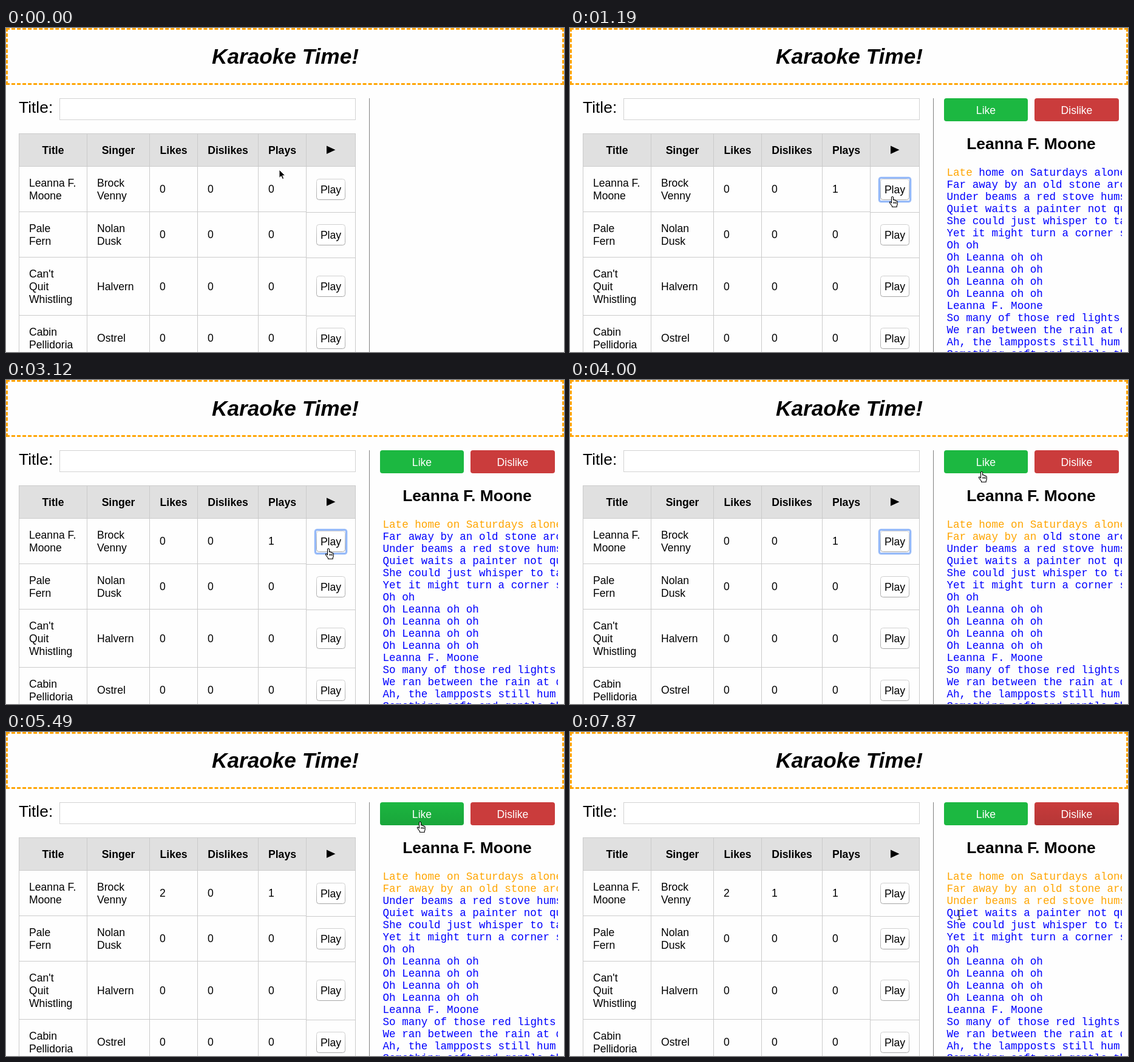
Recreate the animation shown at these times as an HTML page. Size 919 by 535 pixels, loop 8000 ms.

```html
<!DOCTYPE html>
<html lang="en">
<head>
<meta charset="utf-8">
<title>Karaoke Time!</title>
<style>
  html, body { margin: 0; width: 100%; height: 100%; overflow: hidden; background: #fefefe; }
  header { position: absolute; left: 0; top: 0; width: 919px; height: 94px; box-sizing: border-box; border: 3px dashed orange; }
  svg { position: absolute; left: 0; top: 0; }
  text { font: 17.6px "Liberation Sans", Arial, sans-serif; white-space: pre; }
  .mid { text-anchor: middle; }
  .bold { font-weight: bold; }
  .big { font-size: 26.4px; }
  .head { font-size: 35.2px; font-style: italic; }
  .lyric { font-family: "Liberation Mono", "Courier New", monospace; fill: #00f; }
  .white { fill: #fff; }
</style>
</head>
<body>
<header></header>
<svg id="stage" width="919" height="535" viewBox="0 0 919 535">
  <defs>
    <linearGradient id="shade" x1="0" y1="0" x2="0" y2="1">
      <stop offset="0" stop-opacity="0"/>
      <stop offset=".4" stop-opacity=".05"/>
      <stop offset="1" stop-opacity=".1"/>
    </linearGradient>
    <linearGradient id="edge" x1="0" y1="0" x2="0" y2="1">
      <stop offset=".1" stop-color="#d0d0d0"/>
      <stop offset="1" stop-color="#a6a6a6"/>
    </linearGradient>
    <clipPath id="pane"><rect x="600" y="100" width="309" height="435"/></clipPath>
  </defs>
</svg>
<script>
const LOOP = 8000, STEP = 148.1;
const stage = document.getElementById("stage");

function add(parent, tag, attrs, content) {
  const el = document.createElementNS("http://www.w3.org/2000/svg", tag);
  for (const key in attrs) el.setAttribute(key, attrs[key]);
  if (content !== undefined) el.textContent = content;
  parent.appendChild(el);
  return el;
}
const label = (parent, x, y, content, cls = "") => add(parent, "text", { x, y, class: cls }, content);
const box = (parent, x, y, width, height, attrs) => add(parent, "rect", { x, y, width, height, ...attrs });
const show = (el, on) => el.setAttribute("visibility", on ? "inherit" : "hidden");

// Page heading and search field
label(stage, 460, 59, "Karaoke Time!", "mid bold head");
label(stage, 21, 140, "Title:", "big");
box(stage, 88.5, 116.5, 487, 35, { fill: "#fff", stroke: "#d2d2d2" });
box(stage, 598, 116, 1, 419, { fill: "#808080" });

// Song table
const columns = [21, 133, 236, 315, 415, 494, 575];
box(stage, 21, 174, 555, 54, { fill: "#e0e0e0" });
const grid = { fill: "#cbcbcb" };
for (const x of columns) box(stage, x, 174, 1, 361, grid);
for (const y of [174, 228]) box(stage, 21, y, 555, 1, grid);
for (const y of [303, 378, 474]) {
  box(stage, 21, y, 473, 1, grid);
  box(stage, 494, y + 1, 82, 1, grid);
}
["Title", "Singer", "Likes", "Dislikes", "Plays"].forEach((name, i) =>
  label(stage, (columns[i] + columns[i + 1]) / 2 + .5, 208, name, "mid bold"));
add(stage, "path", { d: "M528 194.5L542.5 201.2L528 208Z" });

const songs = [
  { y: 272, title: ["Leanna F.", "Moone"], singer: ["Brock", "Venny"], button: 249 },
  { y: 347, title: ["Pale", "Fern"], singer: ["Nolan", "Dusk"], button: 324 },
  { y: 433, title: ["Can't", "Quit", "Whistling"], singer: ["Halvern"], button: 409 },
  { y: 518, title: ["Cabin", "Pellidoria"], singer: ["Ostrel"], button: 495 }
];
function stack(x, y, lines) {
  lines.forEach((line, i) => label(stage, x, Math.round(y + (i - (lines.length - 1) / 2) * 21 + .1), line));
}
const counts = songs.map(song => {
  stack(38, song.y, song.title);
  stack(150, song.y, song.singer);
  const cells = [253, 332, 432].map(x => label(stage, x, song.y, "0"));
  box(stage, 511.5, song.button + .5, 47, 34, { rx: 4, fill: "#fff", stroke: "url(#edge)" });
  label(stage, 535, song.button + 24, "Play", "mid");
  return cells;
})[0];

const ring = add(stage, "g", { fill: "none", stroke: "#5b93f5" });
box(ring, 509.5, 247.5, 51, 39, { rx: 3, "stroke-width": 3, "stroke-opacity": .62 });
box(ring, 508, 246, 54, 42, { rx: 4, "stroke-width": 1, "stroke-opacity": .3 });

// Player pane
const pane = add(stage, "g", { "clip-path": "url(#pane)" });
function voteButton(x, width, color, name) {
  const place = [x, 116, width, 38];
  box(pane, ...place, { rx: 4, fill: color });
  const hover = box(pane, ...place, { rx: 4, fill: "url(#shade)" });
  const press = add(pane, "g", { fill: "none", stroke: "#000" });
  box(press, x + .5, 116.5, width - 1, 37, { rx: 4, "stroke-opacity": .18 });
  box(press, x + 1.5, 117.5, width - 3, 35, { rx: 3, "stroke-width": 3, "stroke-opacity": .06 });
  label(pane, x + width / 2, 142, name, "mid white");
  return { hover, press };
}
const like = voteButton(616, 138, "#1cb841", "Like");
const dislike = voteButton(765, 139, "#ca3c3c", "Dislike");
label(pane, 759.5, 200, "Leanna F. Moone", "mid bold big");

const chorus = "Oh Leanna oh oh";
const lyrics = [
  "Late home on Saturdays alone",
  "Far away by an old stone arch",
  "Under beams a red stove hums",
  "Quiet waits a painter not quite",
  "She could just whisper to tall",
  "Yet it might turn a corner so",
  "Oh oh", chorus, chorus, chorus, chorus,
  "Leanna F. Moone",
  "So many of those red lights",
  "We ran between the rain at dusk",
  "Ah, the lampposts still hum",
  "Something soft and gentle there"
];
// Step at which each sung word lights up
const cues = [8, 9, 11, 12, 14, 22, 24, 25, 27, 29, 31, 32, 39, 40, 42, 44, 45, 47];
const words = [];
lyrics.forEach((line, i) => {
  const row = label(pane, 620.5, 244 + i * 20, "", "lyric");
  for (const word of line.split(" ")) words.push(add(row, "tspan", {}, word + " "));
});

// Pointer shapes, each with its hot spot at the origin
const pointer = add(stage, "g", {});
const shapes = {
  arrow: add(pointer, "path", {
    d: "M0 0V13.5L3.2 10.6L5.4 15.5L7.6 14.5L5.5 9.8H9.8Z", stroke: "#fff", "stroke-width": 1
  }),
  hand: add(pointer, "path", {
    d: "M-1.5 1.5Q0 -1 1.5 1.5V6l1 -.5q1.5 0 1.5 1.2q1.6 -.6 2.2 1q2 -.4 2 1.8v3q0 1.5 -1 3v2H-.5v-1.5q-2 -2.5 -3.8 -5q-1 -1.8 .6 -2q1.2 .2 2.2 2ZM2 9v3M4.2 9v3M6.2 9.5v2.5",
    fill: "#fff", stroke: "#000", "stroke-width": 1.1, "stroke-linejoin": "round"
  }),
  beam: add(pointer, "path", {
    d: "M-3 -8Q0 -8 0 -6Q0 -8 3 -8M0 -6V6M-3 8Q0 8 0 6Q0 8 3 8M-1.5 3H1.5",
    fill: "none", stroke: "#222", "stroke-width": 1.1
  })
};
const path = [
  [0, 450, 234], [6, 531, 278], [23, 531, 278], [27, 678, 151], [29, 679, 150],
  [34, 679, 150], [36, 682, 148], [38, 682, 148], [42, 821, 133], [50, 821, 133], [53, 641, 302]
];
function pointerAt(k) {
  let i = 0;
  while (i < path.length - 2 && k > path[i + 1][0]) i++;
  const [k0, x0, y0] = path[i], [k1, x1, y1] = path[i + 1];
  const p = Math.min(1, (k - k0) / (k1 - k0));
  const e = p * p * (3 - 2 * p);
  return [x0 + (x1 - x0) * e, y0 + (y1 - y0) * e];
}
function pointerKind(k) {
  if (k < 5 || (k > 23 && k < 27) || k === 52) return "arrow";
  return k > 52 ? "beam" : "hand";
}

function render(time) {
  const k = Math.floor(time / STEP);
  show(pane, k >= 7);
  show(ring, k >= 6 && k < 31);
  show(like.hover, k >= 28 && k < 44);
  show(like.press, k === 31 || k === 35);
  show(dislike.hover, k >= 42);
  show(dislike.press, k === 44);
  if (k < 7) for (const part of [like.hover, like.press, dislike.hover, dislike.press]) show(part, false);

  counts[0].textContent = (k >= 32) + (k >= 36);
  counts[1].textContent = +(k >= 45);
  counts[2].textContent = +(k >= 7);
  cues.forEach((cue, i) => words[i].setAttribute("fill", k >= cue ? "#ffa500" : "#0000ff"));

  const [x, y] = pointerAt(k);
  pointer.setAttribute("transform", `translate(${x.toFixed(1)} ${y.toFixed(1)})`);
  for (const kind in shapes) show(shapes[kind], kind === pointerKind(k));
}

const start = performance.now();
function tick() {
  render((performance.now() - start) % LOOP);
  requestAnimationFrame(tick);
}
tick();
</script>
</body>
</html>
```
